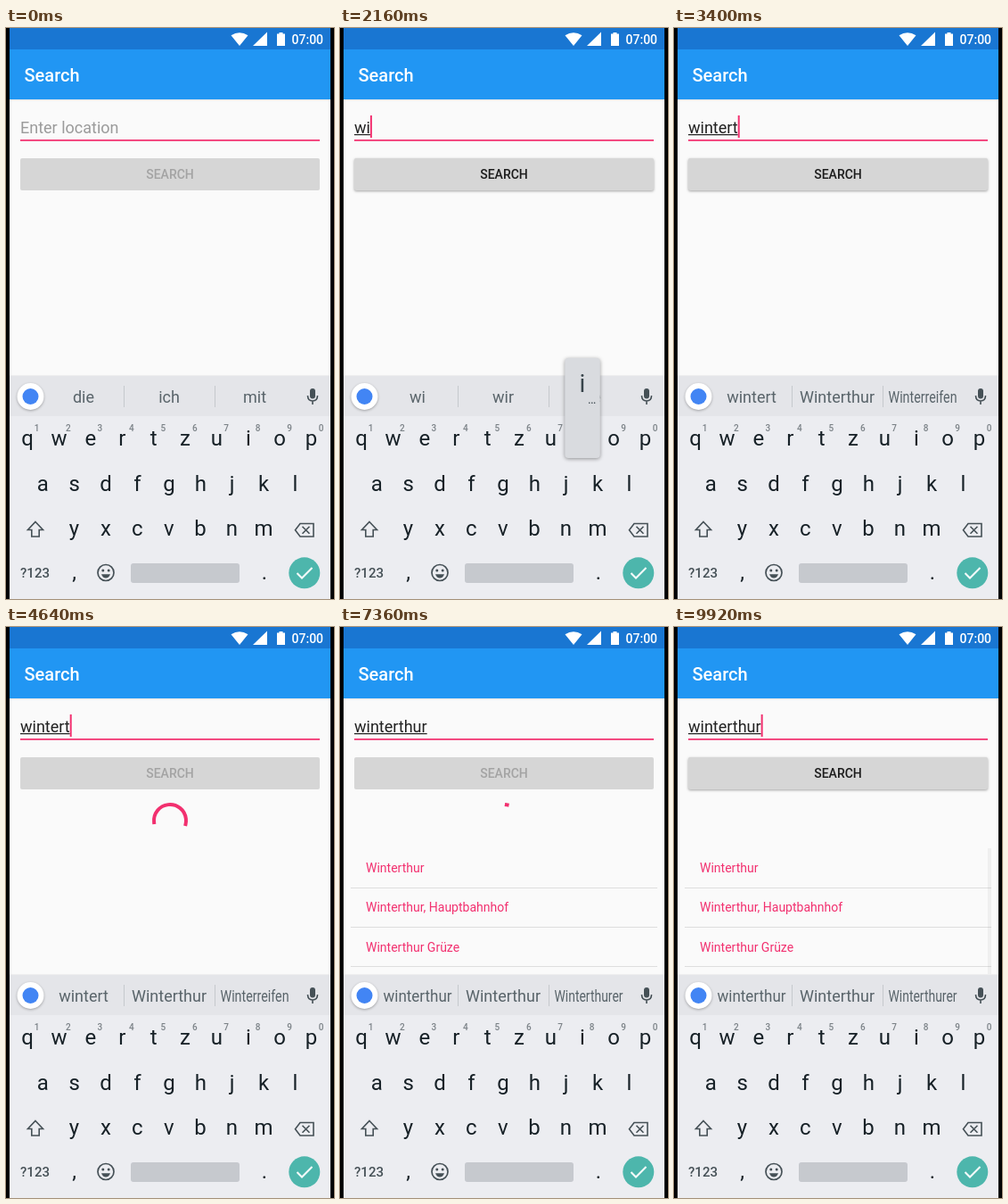
Write an HTML page with a canvas that moves like this. It is 368 px wide and 640 px high and loops after 10 s.

```html
<!DOCTYPE html>
<html lang="en">
<head>
<meta charset="utf-8">
<title>Location search</title>
<style>
html, body { margin: 0; width: 100%; height: 100%; overflow: hidden; background: #000; }
canvas { display: block; }
</style>
</head>
<body>
<canvas width="368" height="640"></canvas>
<script>
const ctx = document.querySelector('canvas').getContext('2d');
const LOOP = 10000, TICK = 40, ACCENT = '#f2306f', ICON = '#455056';

// Key presses: the balloon opens at once, the letter lands shortly after.
const presses = [[1840, 'w'], [2080, 'i'], [2320, 'n'], [2520, 't'], [2720, 'e'], [2920, 'r'],
  [3280, 't'], [6400, 'h'], [6580, 'u'], [6780, 'r']];
const TYPE_DELAY = 80, BALLOON = 120;
const caretToggles = [320, 840, 1320, 4140, 4640, 5140, 5640, 6160, 6480, 7360,
  7860, 8360, 8840, 9360, 9880];
const searches = [{ from: 3840, to: 5520, fade: 7040 }, { from: 7360, to: 8200, fade: 9780 }];
const FADE = 160;
const places = ['Winterthur', 'Winterthur, Hauptbahnhof', 'Winterthur Grüze'];
const guesses = [['ich', 'mit'], ['wir', 'was'], ['wir', 'wie'], ['wind', 'Winter'],
  ['winter', 'Winter'], ['Winter', 'Winters'], ['Winter', 'Winters'], ['Winterthur', 'Winterreifen'],
  ['Winterthur', 'Winterthurer'], ['Winterthur', 'Winterthurer'], ['Winterthur', 'Winterthurer']];

const keys = {};
[['qwertzuiop', 24], ['asdfghjkl', 41.3], ['yxcvbnm', 76.5]].forEach(([row, x], r) =>
  [...row].forEach((key, i) => keys[key] = { x: x + i * 35.4, y: 468 + r * 50.5, row: r }));

function rect(x, y, w, h, color, radius = 0) {
  ctx.fillStyle = color;
  ctx.beginPath();
  ctx.roundRect(x, y, w, h, radius);
  ctx.fill();
}

function disc(x, y, r, color) {
  ctx.fillStyle = color;
  ctx.beginPath();
  ctx.arc(x, y, r, 0, 7);
  ctx.fill();
}

function text(s, x, y, size, color, align = 'left', weight = 400, max) {
  ctx.font = `${weight} ${size}px Roboto, sans-serif`;
  ctx.textAlign = align;
  ctx.fillStyle = color;
  ctx.fillText(s, x, y, max);
}

function fillPath(d, color) {
  ctx.fillStyle = color;
  ctx.fill(new Path2D(d));
}

function strokePath(d, color, width) {
  ctx.strokeStyle = color;
  ctx.lineWidth = width;
  ctx.stroke(new Path2D(d));
}

function shadowed(blur, dy, alpha, draw) {
  ctx.save();
  ctx.shadowColor = `rgba(0,0,0,${alpha})`;
  ctx.shadowBlur = blur;
  ctx.shadowOffsetY = dy;
  draw();
  ctx.restore();
}

// Height at x of a Bézier from (x0, 0) to (x3, 1) with controls (x1, 0) and (x2, 1).
function ease(x, x0, x1, x2, x3) {
  if (x <= x0) return 0;
  if (x >= x3) return 1;
  let lo = 0, hi = 1, s;
  for (let i = 0; i < 24; i++) {
    s = (lo + hi) / 2;
    const u = 1 - s;
    const at = u * u * u * x0 + 3 * u * u * s * x1 + 3 * u * s * s * x2 + s * s * s * x3;
    if (at < x) lo = s; else hi = s;
  }
  return s * s * (3 - 2 * s);
}

function drawTop() {
  rect(4, 0, 360, 640, '#fafafa');
  rect(4, 80, 360, 1, '#e9e9e9');
  rect(4, 81, 360, 1, '#f3f3f3');
  rect(4, 0, 360, 24, '#1976d2');
  rect(4, 24, 360, 56, '#2196f3');
  fillPath('M262 20 L252.5 8.2 Q262 2.2 271.5 8.2Z M277 20 L293 4.5 V20Z', '#fff');
  fillPath('M304 6.5 H306.5 V5 H310.5 V6.5 H313 V20 H304Z', '#fff');
  text('07:00', 320.5, 17.5, 14, '#fff', 'left', 500);
  text('Search', 20.5, 60, 20, '#fff', 'left', 500);
}

function drawField(value, caret) {
  rect(16, 125, 336, 1.8, ACCENT);
  text(value || 'Enter location', 16, 118, 18, value ? '#212121' : '#9b9b9b');
  const width = value ? ctx.measureText(value).width : 0;
  if (value) rect(16, 119, width, 1.2, '#222');
  if (caret) rect(16 + width, 98, 2, 25, ACCENT);
}

function drawButton(enabled) {
  const face = () => rect(16, 146, 336, 36, '#d6d6d6', 2);
  if (enabled) shadowed(3, 1, 0.35, face); else face();
  text('SEARCH', 184, 169, 14, enabled ? '#1b1b1b' : '#a3a3a3', 'center', 500);
}

function drawSpinner(ms) {
  const p = ms / 1333 % 1, turn = ms / 4444 * 2 + p / 4;
  const start = turn + 0.75 * ease(p, 0.5, 0.7, 0.6, 1);
  const end = turn + 0.75 * ease(p, 0, 0.2, 0.1, 0.5);
  const angle = v => (v - 0.25) * 2 * Math.PI;
  ctx.strokeStyle = ACCENT;
  ctx.lineWidth = 4;
  ctx.lineCap = 'square';
  ctx.beginPath();
  ctx.arc(184, 217, 18, angle(start), angle(Math.max(end, start + 0.002)));
  ctx.stroke();
  ctx.lineCap = 'butt';
}

function drawList(barAlpha) {
  places.forEach((place, i) => {
    text(place, 29, 275 + i * 44.4, 14, ACCENT);
    rect(12, Math.round(291.6 + i * 44.4), 344, 1, '#dedede');
  });
  if (barAlpha > 0) rect(352, 248, 4, 143, `rgba(125,125,125,${0.65 * barAlpha})`);
}

function drawKeyboard(words) {
  rect(4, 389, 360, 1, '#eeeeef');
  rect(4, 390, 360, 45, '#e4e5e9');
  rect(4, 435, 360, 205, '#ecedf1');
  shadowed(3, 1, 0.3, () => disc(27.5, 413, 15, '#fff'));
  disc(27.5, 413, 9, '#4285f4');
  words.forEach((word, i) =>
    text(word, 87 + 96 * i, 420, 18, '#59646a', 'center', 400, i === 1 ? 90 : 77));
  rect(132, 401, 1, 24, '#c6c9cd');
  rect(234, 401, 1, 24, '#c6c9cd');

  rect(341, 404, 6, 11.5, ICON, 3);
  strokePath('M338.5 412 Q338.5 418 344 418 T349.5 412 M344 418 V422', ICON, 1.6);

  for (const [key, { x, y }] of Object.entries(keys)) text(key, x, y, 24, '#172127', 'center');
  for (let i = 0; i < 10; i++)
    text((i + 1) % 10, 34.5 + i * 35.45, 452, 10, '#7b8287', 'center', 500);

  strokePath('M33 553.5 L41.5 562.5 H37.2 V570 H28.8 V562.5 H24.5Z', ICON, 1.6);
  strokePath('M330 555.5 H345 V570 H330 L324.5 562.8Z M332.5 558.7 L340.5 566.8 M340.5 558.7 L332.5 566.8',
    ICON, 1.6);

  text('?123', 32.5, 616, 15, ICON, 'center', 500);
  text(',', 76.5, 618, 24, '#172127', 'center');
  text('.', 290, 618, 24, '#172127', 'center');
  ctx.beginPath();
  ctx.arc(112, 610.5, 9, 0, 7);
  ctx.strokeStyle = ICON;
  ctx.lineWidth = 1.7;
  ctx.stroke();
  disc(108.8, 608, 1.5, ICON);
  disc(115.2, 608, 1.5, ICON);
  fillPath('M107 612.3 H117 Q115.5 616.5 112 616.5 T107 612.3Z', ICON);
  rect(140, 600, 122, 22, '#c6c9ce', 3);
  disc(334.8, 610.8, 17.5, '#4db6ac');
  strokePath('M326.5 611 L332 616.5 L343.5 605', '#fff', 2);
}

function drawBalloon(key) {
  const { x, y, row } = keys[key];
  shadowed(4, 1, 0.4, () => rect(x - 19.5, y - 98, 39.5, 112, '#d9dbdf', 4));
  text(key, x, y - 60, 28, '#37434a', 'center');
  if (row === 0 || key === 'n') text('…', x + 11, y - 47, 14, '#37434a', 'center');
}

function draw(t) {
  const value = presses.filter(([at]) => t >= at + TYPE_DELAY).map(p => p[1]).join('');
  const search = searches.find(s => t >= s.from && t < s.to);
  const finished = searches.filter(s => t >= s.to).pop();
  ctx.clearRect(0, 0, 368, 640);
  drawTop();
  drawField(value, caretToggles.filter(at => t >= at).length % 2);
  drawButton(value && !search);
  if (search) drawSpinner(t - search.from + TICK);
  if (finished) drawList(Math.min(1, 1 - (t - finished.fade) / FADE));
  drawKeyboard([value || 'die', ...guesses[value.length]]);
  const press = presses.find(([at]) => t >= at && t < at + BALLOON);
  if (press) drawBalloon(press[1]);
}

function loop() {
  const t = performance.now() % LOOP;
  draw(Math.floor(t / TICK) * TICK);
  requestAnimationFrame(loop);
}
loop();
</script>
</body>
</html>
```
